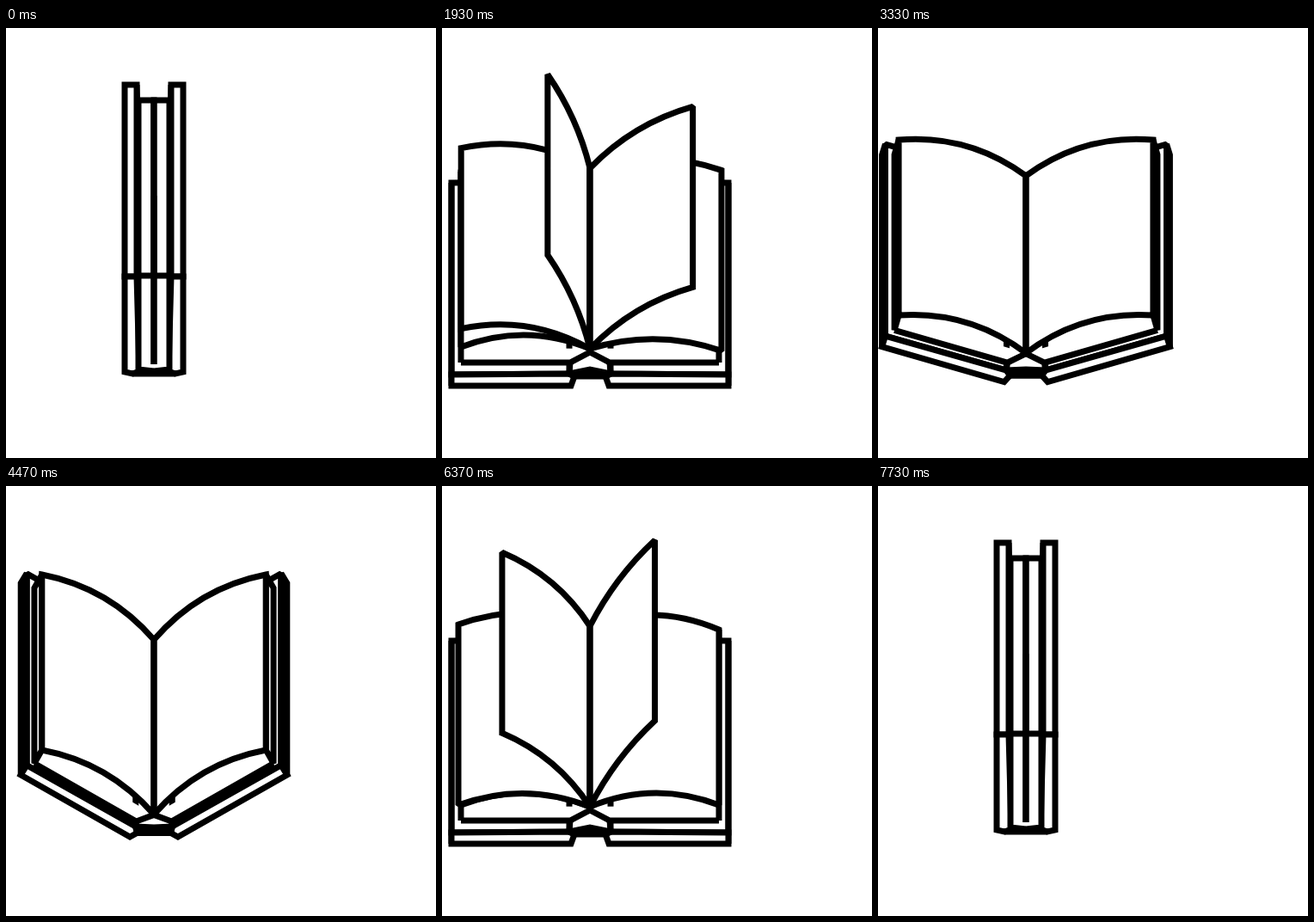
Recreate the animation shown at these times as an HTML page with a canvas. Size 500 by 500 pixels, loop 7.77 s.

```html
<!DOCTYPE html>
<html lang="en">
<head>
<meta charset="utf-8">
<title>Book</title>
<style>
  html, body { margin: 0; width: 100%; height: 100%; overflow: hidden; background: #fff; }
  canvas { display: block; width: 500px; height: 500px; }
</style>
</head>
<body>
<canvas id="stage" width="500" height="500"></canvas>
<script>
const ctx = document.getElementById('stage').getContext('2d');
const LOOP = 7770, MID = 172, LINE = 7;
const CYCLES = [
  { open: [170, 870], turn: [970, 3030], close: [3170, 3870] },
  { open: [4070, 4730], turn: [4870, 6900], close: [7070, 7730] }
];
const SWING_STEPS = 18, TURN_STEPS = 52;
const LEAVES = 6, LEAF_STEPS = 24, LEAF_GAP = 6;
const COVER_H = 223, BLOCK_H = 204, LEAF_H = 210;

const ease = u => (1 - Math.cos(Math.PI * u)) / 2;
const add = ([x, y], dx, dy) => [x + dx, y + dy];
const up = (p, h) => add(p, 0, -h);
const mirror = ([x, y]) => [2 * MID - x, y];

// Number of picture changes made so far in a span of evenly spaced steps.
function stepsDone(t, [start, end], count) {
  if (t < start) return 0;
  const gap = (end - start) / (count - 1);
  return Math.min(count, Math.round((t - start) / gap) + 1);
}

// Curve between two points, bowed to the side.
function arc(from, to, bow) {
  const dx = to[0] - from[0], dy = to[1] - from[1];
  const k = bow / Math.hypot(dx, dy);
  const at = f => add(from, dx * f + dy * k, dy * f - dx * k);
  return [from, at(1 / 3), at(2 / 3), to];
}

// Key points of the right half; the cover swings from flat (0) to shut (PI / 2).
function pose(angle) {
  const s = Math.sin(angle), c = Math.cos(angle);
  const swing = (p, flat, shut) => {
    const r = flat + 55 * s + (shut - flat - 55) * s * s;
    return add(p, r * c, -r * s);
  };
  const hingeOut = [194 + 12 * s, 416 - 16 * s];
  const coverOut = swing(hingeOut, 139, 111);
  const root = [195 - 5 * s, 389 + 8 * s ** 3];
  const back = swing(root, 127, 109);
  const gutter = [MID, 373 + 18 * s];
  const tip = add(back, -18 * s, -18 * c);
  return {
    hingeOut, coverOut, root, back, gutter, tip,
    hingeIn: add(hingeOut, 2 * c - 17 * s, -14 * c),
    coverIn: add(coverOut, -14 * s, -13 * c),
    spine: [190 + 7 * s * s, 405 - 3 * s],
    gutterTop: [MID, 163 + 32 * s],
    valley: [MID, 377 + 22 * s * s],
    bow: 20 * c
  };
}

function mirrorPose(p) {
  const left = { bow: -p.bow };
  for (const name in p) if (name !== 'bow') left[name] = mirror(p[name]);
  return left;
}

function trace(points, close) {
  ctx.beginPath();
  points.forEach(p => ctx.lineTo(...p));
  if (close) ctx.closePath();
}

function shape(points, fill = '#fff') {
  trace(points, true);
  ctx.fillStyle = fill;
  ctx.fill();
  ctx.stroke();
}

function line(points) {
  trace(points, false);
  ctx.stroke();
}

// Sheet between a curved top and a curved bottom edge.
function sheet(top, bottom) {
  ctx.beginPath();
  ctx.moveTo(...top[0]);
  ctx.bezierCurveTo(...top[1], ...top[2], ...top[3]);
  ctx.lineTo(...bottom[3]);
  ctx.bezierCurveTo(...bottom[2], ...bottom[1], ...bottom[0]);
  ctx.closePath();
  ctx.fillStyle = '#fff';
  ctx.fill();
  ctx.stroke();
}

function drawCover(p) {
  shape([p.coverIn, up(p.coverIn, COVER_H), up(p.hingeIn, COVER_H), p.hingeIn]);
  shape([p.coverOut, up(p.coverOut, COVER_H), up(p.coverIn, COVER_H), p.coverIn]);
  shape([p.coverOut, p.hingeOut, p.spine, p.hingeIn, p.coverIn]);
}

function drawBlock(p) {
  trace([p.tip, p.gutter, p.valley, p.root, p.back], true);
  ctx.fillStyle = '#fff';
  ctx.fill();
  line([p.back, p.root, p.valley]);
  line([p.root, p.hingeIn]);
  const tipTop = up(p.tip, BLOCK_H);
  shape([p.tip, tipTop, up(p.back, BLOCK_H), p.back]);
  sheet(arc(p.gutterTop, tipTop, p.bow), arc(p.gutter, p.tip, p.bow));
}

function drawBook(angle) {
  const right = pose(angle), left = mirrorPose(right);
  drawCover(left);
  drawCover(right);
  shape([left.hingeIn, [MID, 397], right.hingeIn, right.spine, left.spine], '#000');
  drawBlock(left);
  drawBlock(right);
  line([right.gutterTop, right.gutter]);
}

function drawLeaf(u) {
  const a = (187 * ease(u) - 3) * Math.PI / 180;
  const root = [MID, 163];
  const tip = add(root, 153 * Math.cos(a), -115 * Math.sin(a));
  const top = arc(root, tip, 18 * Math.cos(a) - 1.5);
  sheet(top, top.map(p => up(p, -LEAF_H)));
}

function drawLeaves(done) {
  if (done === 0 || done === TURN_STEPS) return;
  const turning = [];
  for (let k = 0; k < LEAVES; k++) {
    const u = (done + 0.5 - k * LEAF_GAP) / LEAF_STEPS;
    if (u > 0 && u < 1) turning.push(u);
  }
  // Lowest leaf of each pile first.
  turning.filter(u => u > 0.5).forEach(drawLeaf);
  turning.filter(u => u <= 0.5).reverse().forEach(drawLeaf);
  line([[MID, 163], [MID, 377]]);
}

function draw(t) {
  ctx.fillStyle = '#fff';
  ctx.fillRect(0, 0, 500, 500);
  ctx.lineWidth = LINE;
  ctx.miterLimit = 1.6;
  let opened = 0;
  for (const c of CYCLES) {
    opened += ease(stepsDone(t, c.open, SWING_STEPS) / SWING_STEPS)
            - ease(stepsDone(t, c.close, SWING_STEPS) / SWING_STEPS);
  }
  drawBook((1 - opened) * Math.PI / 2);
  for (const c of CYCLES) drawLeaves(stepsDone(t, c.turn, TURN_STEPS));
}

const begin = performance.now();
function frame() {
  draw((performance.now() - begin) % LOOP);
  requestAnimationFrame(frame);
}
frame();
</script>
</body>
</html>
```
